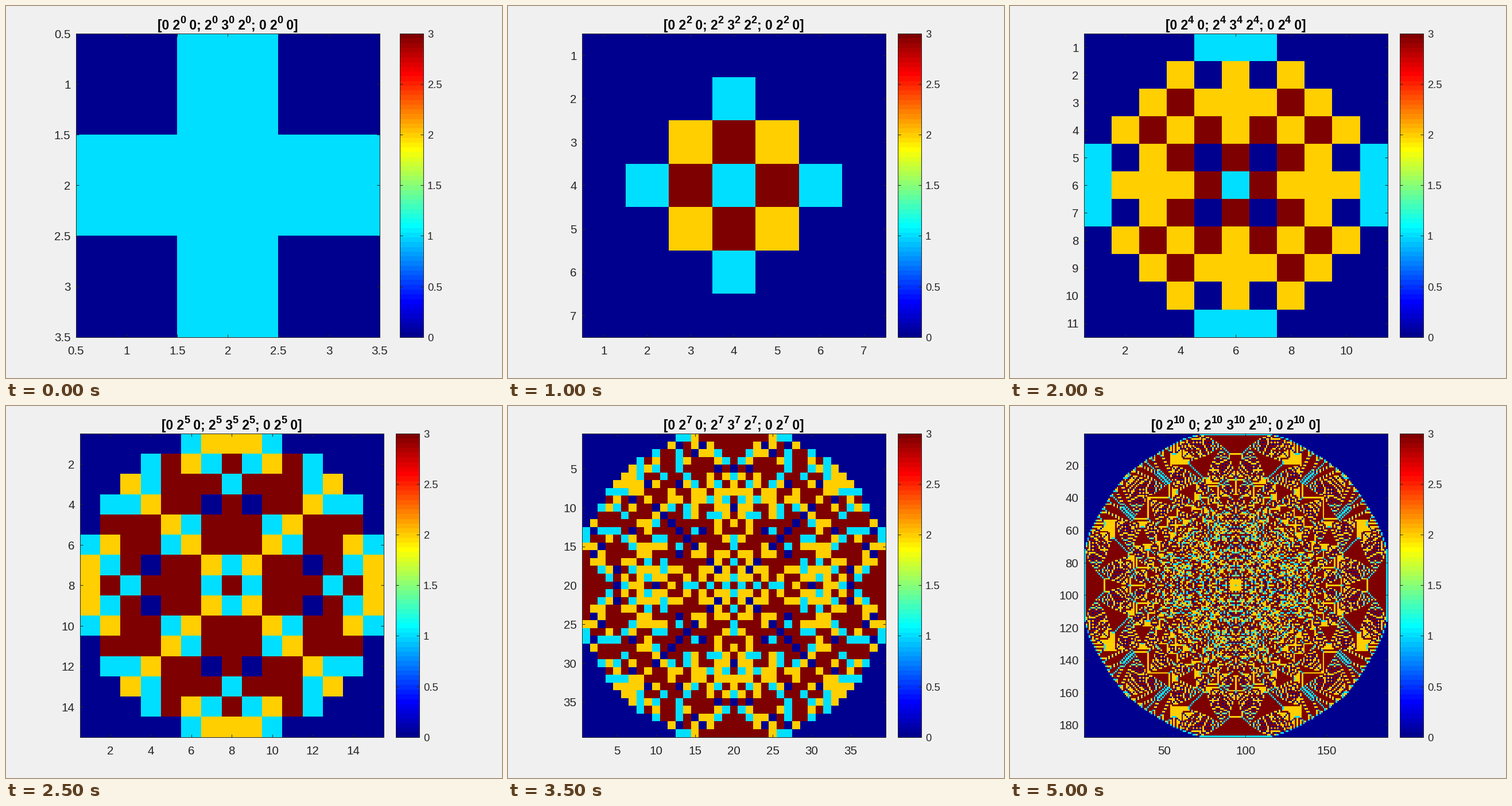
Write a matplotlib script that moves like this. It is 864x648 px and loops after 5500 ms.

```python
import math

import matplotlib.pyplot as plt
import numpy as np
from matplotlib.animation import FuncAnimation
from matplotlib.colors import ListedColormap
from matplotlib.patches import Rectangle
from matplotlib.textpath import TextPath

W, H = 864, 648
LEFT, TOP = 129, 48
SIDE = 528.6
BAR = 41
TICK = 5
INK = "#262626"
FONT = "Liberation Sans"
LABEL, BAR_LABEL, TITLE, SUPER = 20.6, 18.5, 22.7, 18.1
STEPS = (0.5, 1, 2, 5, 10, 20, 50)
POWERS = 11
MIN_RADIUS = {2: 3, 6: 12}


def jet(count=64):
    i = np.arange(count)
    ramps = [np.minimum(i - lo, hi - i) / 16
             for lo, hi in ((23, 71), (7, 55), (-9, 39))]
    return ListedColormap(np.clip(np.array(ramps).T, 0, 1))


def settle(k):
    """Stabilise the sandpile [0 2^k 0; 2^k 3^k 2^k; 0 2^k 0] on one quadrant."""
    size = int(0.4 * math.sqrt(4 * 2**k + 3**k)) + 5
    q = np.zeros((size, size), dtype=np.int32)
    q[0, 0] = 3**k
    q[0, 1] = q[1, 0] = 2**k
    while True:
        t = q >> 2
        if not t.any():
            break
        q &= 3
        q[1:] += t[:-1]
        q[:-1] += t[1:]
        q[:, 1:] += t[:, :-1]
        q[:, :-1] += t[:, 1:]
        # the mirrored neighbours across both axes
        q[0] += t[1]
        q[:, 0] += t[:, 1]
    radius = max(int(np.nonzero(q)[0].max()), MIN_RADIUS.get(k, 0))
    q = q[:radius + 1, :radius + 1]
    return np.pad(q, ((radius, 0), (radius, 0)), mode="reflect")


def advance(s, size, weight="normal"):
    def ink(t):
        prop = {"family": FONT, "weight": weight}
        return TextPath((0, 0), t, size=size, prop=prop).get_extents().width
    return ink("|" + s + "|") - ink("||")


def write(x, y, s, size, align=0.0, color=INK, weight="normal"):
    """Text on baseline y; align 0 is left, 0.5 centre, 1 right."""
    x -= align * advance(s, size, weight)
    ax.text(x, y, s, fontsize=size, family=FONT, weight=weight, color=color,
            ha="left", va="baseline")


def write_title(mid, k):
    parts = []
    for chunk in ("[0 2", " 0; 2", " 3", " 2", "; 0 2"):
        parts += [(chunk, TITLE, 41), (str(k), SUPER, 30.5)]
    parts.append((" 0]", TITLE, 41))
    widths = [advance(s, size, "bold") for s, size, _ in parts]
    x = mid - sum(widths) / 2
    for (s, size, y), w in zip(parts, widths):
        write(x, y, s, size, color="black", weight="bold")
        x += w


def ticks(n, most):
    step = next(s for s in STEPS if n / s <= most)
    first, last = math.ceil(0.5 / step), math.floor((n + 0.5) / step)
    return [(f"{i * step:g}", (i * step - 0.5) / n * SIDE)
            for i in range(first, last + 1)]


def cells(n, length):
    """Index of the cell under the centre of each pixel."""
    return ((np.arange(math.ceil(length)) + 0.5) / length * n).astype(int)


def panel(data, x, width, vmax):
    rows, cols = data.shape
    pixels = data[np.ix_(cells(rows, SIDE), cells(cols, width))]
    h, w = pixels.shape
    ax.imshow(pixels, cmap=JET, extent=(x, x + w, TOP + h, TOP),
              vmin=0, vmax=vmax, interpolation="nearest", aspect="auto")
    ax.add_patch(Rectangle((x, TOP), width, SIDE, fill=False, ec=INK, lw=1,
                           snap=True, zorder=3))


def side_ticks(ys, x, width):
    ax.hlines(ys, x, x + TICK, color=INK, lw=1, snap=True)
    ax.hlines(ys, x + width - TICK, x + width, color=INK, lw=1, snap=True)


def draw(k):
    ax.clear()
    ax.axis("off")
    pile = PILES[k]
    n = len(pile)
    xt, yt = ticks(n, 8), ticks(n, 11)
    bottom = TOP + SIDE

    # a last label that sticks out pushes the colour bar away
    name, pos = xt[-1]
    extra = max(0, round(pos + advance(name, LABEL) / 2 - SIDE))
    left = LEFT - extra // 2
    bar = left + 550 + extra

    panel(pile, left, SIDE, 3)
    xs = [left + p for _, p in xt]
    ax.vlines(xs, TOP, TOP + TICK, color=INK, lw=1, snap=True)
    ax.vlines(xs, bottom - TICK, bottom, color=INK, lw=1, snap=True)
    side_ticks([TOP + p for _, p in yt], left, SIDE)
    for s, p in xt:
        write(left + p, 607, s, LABEL, 0.5)
    for s, p in yt:
        write(left - 9.5, TOP + p + 7.8, s, LABEL, 1)

    panel(np.arange(64)[::-1, None], bar, BAR, 63)
    levels = [(i / 2, bottom - i * SIDE / 6) for i in range(7)]
    side_ticks([y for _, y in levels[1:-1]], bar, BAR)
    for v, y in levels:
        write(bar + BAR + 7, y + 7, f"{v:g}", BAR_LABEL)

    write_title(left + SIDE / 2, k)
    ax.set_xlim(0, W)
    ax.set_ylim(H, 0)
    return []


JET = jet()
PILES = [settle(k) for k in range(POWERS)]

fig = plt.figure(figsize=(W / 72, H / 72), dpi=72, facecolor="#f0f0f0")
ax = fig.add_axes([0, 0, 1, 1])

anim = FuncAnimation(fig, draw, frames=POWERS, interval=500, repeat=True,
                     repeat_delay=0, blit=False)
plt.show()
```
